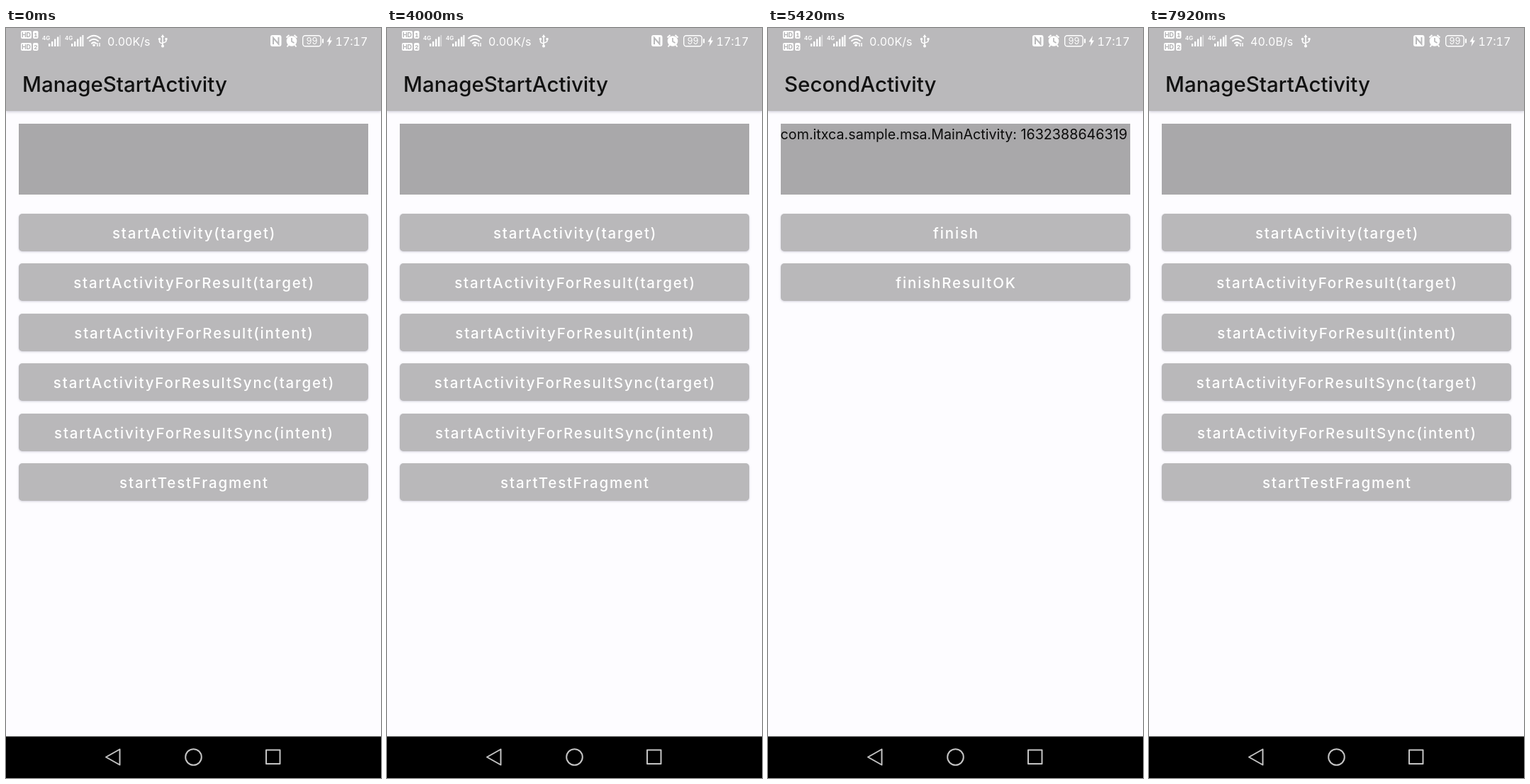
These frames come from a looping animation (529 px wide and 1058 px high, 8 s). An HTML page:

```html
<!DOCTYPE html>
<html lang="en">
<head>
<meta charset="utf-8">
<title>ManageStartActivity</title>
<style>
  html, body { margin: 0; width: 100%; height: 100%; overflow: hidden; background: #000; }
  #stage {
    position: relative; width: 529px; height: 1058px; overflow: hidden;
    font-family: Inter, Roboto, "Open Sans", sans-serif; white-space: nowrap;
  }
  .page { position: absolute; inset: 0 0 58px; background: #fdfcff; overflow: hidden; }
  .bar {
    position: absolute; inset: 0 0 auto; height: 117px; background: #bab9bb;
    box-shadow: 0 1px 4px rgba(80, 75, 110, .32);
  }
  h1 {
    position: absolute; left: 23px; top: 58px; margin: 0;
    font-size: 29.5px; line-height: 42px; font-weight: 500; color: #111;
  }
  .panel {
    position: absolute; left: 17.6px; top: 135.3px; width: 493.8px; height: 99.7px;
    background: #a9a8aa; color: #0c0c0c; font-size: 19.7px; line-height: 31px;
  }
  .btn {
    position: absolute; left: 17.6px; width: 493.8px; height: 52.9px; border-radius: 5px;
    background: #b9b8ba; color: #fff; text-align: center; text-indent: 2px;
    font-size: 20.5px; line-height: 55px; font-weight: 500; letter-spacing: 1.84px;
    box-shadow: 0 1px 3px rgba(80, 75, 110, .24);
  }
  .ripple { position: absolute; inset: 0; border-radius: 5px; background: #fff; opacity: 0; }
  #shade { position: absolute; inset: 0 0 58px; background: #000; opacity: 0; }
  #status, #nav { position: absolute; left: 0; top: 0; }
  #status text { font-variant-numeric: tabular-nums; }
</style>
</head>
<body>
<div id="stage">
  <div class="page" id="main"></div>
  <div id="shade"></div>
  <div class="page" id="second"></div>

  <svg id="status" width="529" height="40" fill="#fff" font-family="Inter, Roboto, sans-serif">
    <defs>
      <g id="hd">
        <rect x="21" y="4" width="15" height="11" rx="2"/>
        <rect x="38" y="4" width="7.5" height="11" rx="2"/>
        <text x="28.5" y="13" font-size="9" font-weight="700" text-anchor="middle" fill="#b0b0b2">HD</text>
      </g>
      <g id="signal">
        <text x="51" y="17" font-size="8" font-weight="600">4G</text>
        <path d="M60 22h2.4v4H60zM64 19h2.4v7H64zM68 15.5h2.4V26H68zM72 12.5h2.4V26H72z"/>
      </g>
    </defs>
    <use href="#hd"/>
    <use href="#hd" y="17"/>
    <g font-size="8" font-weight="700" text-anchor="middle" fill="#b0b0b2">
      <text x="41.8" y="12.5">1</text>
      <text x="41.8" y="29.5">2</text>
    </g>
    <use href="#signal"/>
    <rect x="75.5" y="10" width="1.6" height="16" opacity=".45"/>
    <use href="#signal" x="32"/>
    <rect x="107.4" y="10" width="2" height="16"/>

    <g fill="none" stroke="#fff" stroke-width="2" stroke-linecap="round">
      <path d="M115 14.5Q124 7 133 14.5M118 18.2Q124 13.2 130 18.2M121 21.6Q124 19.2 127 21.6"/>
      <path d="M221 11.5V25M216.5 16v3q0 2 4.5 3M226 15.5v2.5q0 2-5 3" stroke-width="1.6"/>
    </g>
    <circle cx="124" cy="24.3" r="1.8"/>
    <path d="M129 21v5M132 21v5" stroke="#fff" stroke-width="1.4"/>
    <path d="M221 9l2.5 4h-5z"/>
    <circle cx="221" cy="25.5" r="2"/>
    <circle cx="216.5" cy="15.5" r="1.7"/>
    <rect x="224.5" y="14" width="3" height="3"/>

    <text id="speed" x="143" y="25" font-size="16"></text>

    <rect x="373" y="10" width="15.5" height="16" rx="3"/>
    <path d="M377 23v-9l7.5 8.5V13" fill="none" stroke="#b9b9bb" stroke-width="2"/>

    <circle cx="403" cy="18.5" r="7.3"/>
    <path d="M395.5 13.5l4-3.5M410.5 13.5l-4-3.5M398.5 24l-2 2.5M407.5 24l2 2.5" stroke="#fff" stroke-width="2"/>
    <path d="M403 14v5l3.5 2" fill="none" stroke="#b9b9bb" stroke-width="1.7"/>

    <rect x="418.7" y="10.7" width="25.5" height="15" rx="3.5" fill="none" stroke="#fff" stroke-width="1.4"/>
    <rect x="446" y="15" width="2" height="6.5" rx="1"/>
    <text x="431.5" y="22.7" font-size="12.5" text-anchor="middle">99</text>
    <path d="M458 11l-5.5 8.5h3.2L454.5 26l5.5-8.5h-3.2z"/>
    <text x="464.5" y="25" font-size="16">17:17</text>
  </svg>

  <svg id="nav" style="top:999px" width="529" height="59">
    <rect y=".4" width="529" height="59"/>
    <g fill="none" stroke="#c4c4c4" stroke-width="2" stroke-linejoin="round">
      <path d="M141 29.500L160.500 18.500V40.500Z"/>
      <circle cx="264.500" cy="29.500" r="11.300"/>
      <rect x="367" y="19.500" width="19.500" height="19.500"/>
    </g>
  </svg>
</div>

<script>
const LOOP = 8000, WIDTH = 529, FPS = 12;
const $ = id => document.getElementById(id);

function buildPage(id, title, note, labels) {
  const buttons = labels.map((label, i) =>
    `<div class="btn" style="top:${261.8 + i * 70.5}px">${label}${i ? '' : '<div class="ripple"></div>'}</div>`);
  $(id).innerHTML =
    `<div class="bar"></div><h1>${title}</h1><div class="panel">${note}</div>${buttons.join('')}`;
  return { el: $(id), ripple: $(id).querySelector('.ripple') };
}

const main = buildPage('main', 'ManageStartActivity', '', [
  'startActivity(target)', 'startActivityForResult(target)', 'startActivityForResult(intent)',
  'startActivityForResultSync(target)', 'startActivityForResultSync(intent)', 'startTestFragment'
]);
const second = buildPage('second', 'SecondActivity',
  'com.itxca.sample.msa.MainActivity: 1632388646319', ['finish', 'finishResultOK']);

const clamp = v => Math.max(0, Math.min(1, v));

// cubic-bezier(.2, 0, .2, 1)
function ease(x) {
  x = clamp(x);
  let lo = 0, hi = 1;
  for (let i = 0; i < 24; i++) {
    const s = (lo + hi) / 2;
    if (.6 * s * (1 - s) + s ** 3 < x) lo = s; else hi = s;
  }
  return lo * lo * (3 - 2 * lo);
}

function drawRipple(el, t, start, end) {
  const grow = clamp((t - start + 60) / 260);
  const fade = 1 - clamp((t - end) / 170);
  el.style.opacity = t < start ? 0 : .1 * fade;
  el.style.clipPath = `circle(${grow * 260}px at 50% 50%)`;
}

function speedAt(t) {
  if (t >= 7910) return '40.0B/s';
  return t >= 2160 && t < 3995 ? '1.88K/s' : '0.00K/s';
}

function draw(time) {
  const t = Math.floor((time + 4) * FPS / 1000) * 1000 / FPS;
  const shown = ease((t - 4652) / 320) - ease((t - 6900) / 330);
  const edge = WIDTH * (1 - shown);

  main.el.style.transform = `translateX(${-.2 * WIDTH * shown}px)`;
  $('shade').style.opacity = .13 * shown;
  second.el.style.visibility = shown > 0 ? 'visible' : 'hidden';
  second.el.style.transform = `translateX(${edge / 2}px)`;
  second.el.style.clipPath = `inset(0 0 0 ${edge / 2}px)`;

  drawRipple(main.ripple, t, 4160, 4680);
  drawRipple(second.ripple, t, 6580, 6930);
  $('speed').textContent = speedAt(t);
}

const began = performance.now();
function tick() {
  draw((performance.now() - began) % LOOP);
  requestAnimationFrame(tick);
}
tick();
</script>
</body>
</html>
```
